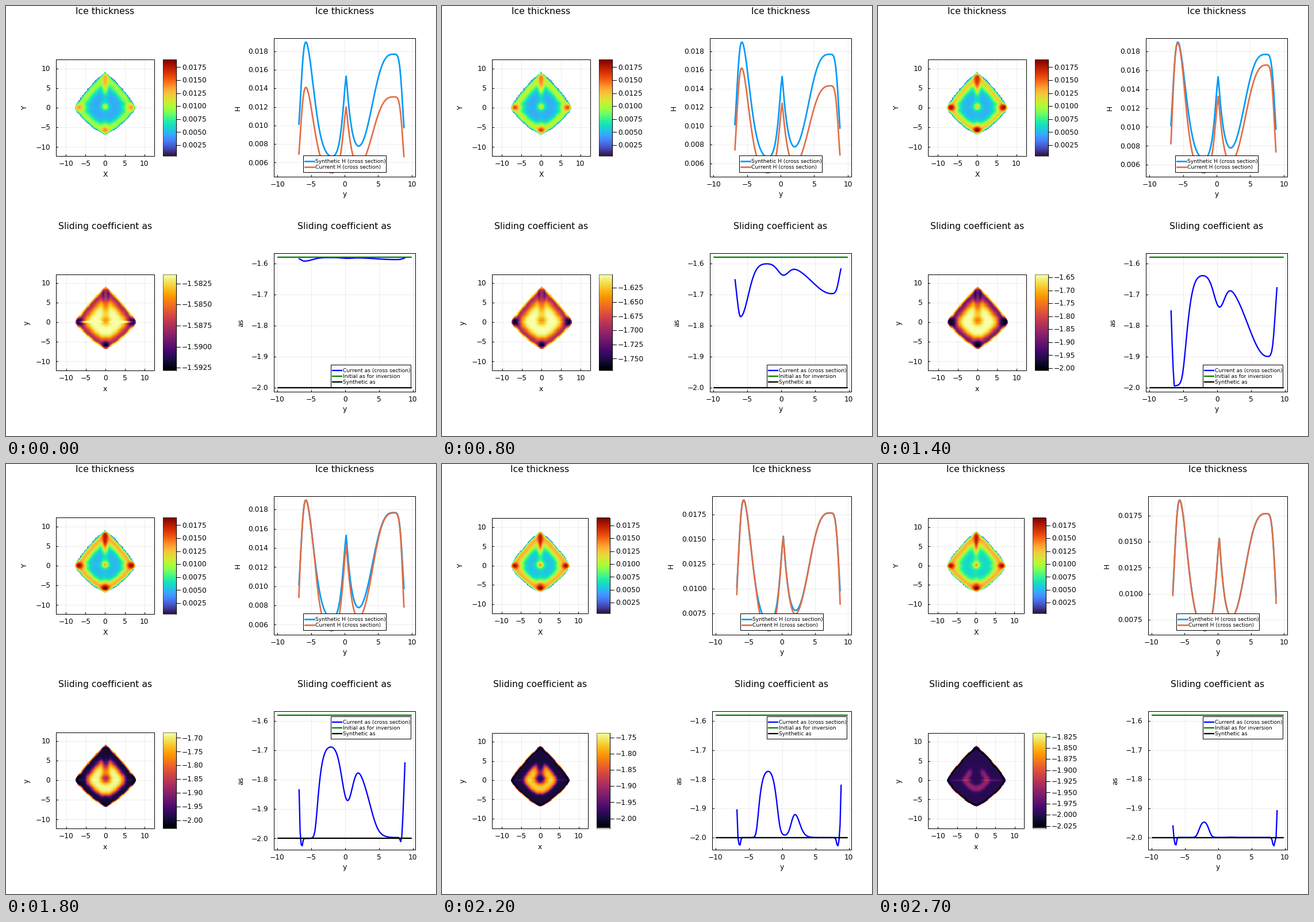
Animation of 748x748 px, one loop 2800 ms. Source, as a matplotlib script:

```python
import math

import numpy as np
import matplotlib.pyplot as plt
from matplotlib.animation import FuncAnimation
from matplotlib.patches import Rectangle

SIZE, DPI, FRAMES, STEP_MS = 748, 100, 28, 100
PX = 72 / DPI                      # points per pixel
TICK, LEGEND, TITLE = 12.3, 9.1, 15.8
BLUE, ORANGE = "#009af9", "#e26f46"
RELAYOUT, LEGEND_UP = 19, 16       # steps at which the layout / legend jump

N = 128
DX = 20 / N
GRID = -10 + DX * (np.arange(N) + 0.5)
SECTION = GRID[(GRID > -6.81) & (GRID < 8.84)]
MID = 0.234                        # the summit lies a little north of the origin
START, GOAL = -1.58, -2.0


def hill(d, wl, pl, wr=None, pr=None):
    """Bump of height 1 with its own width and power on either side."""
    wr, pr = wr or wl, pr or pl
    return np.where(d < 0, np.exp(-(np.abs(d) / wl) ** pl),
                    np.exp(-(np.abs(d) / wr) ** pr))


def ridge_height(y):
    """Synthetic thickness along x = 0, in 1e-3."""
    return (6.4 + 12.6 * hill(y + 5.74, .977, 2.5, 1.65, 1.75)
            + 8.9 * hill(y - MID, .73, 1.4, .8, 1.1)
            + 11.28 * hill(y - 7.37, 3.73, 3, 1.39, 4))


def ridge_rate(y):
    """How fast the inversion moves the coefficient along x = 0."""
    return (.011 + .092 * hill(y + 6, .75, 2, 1.6, 2) + .018 * hill(y - .3, 1.1, 2)
            + .052 * hill(y - 7.4, 4, 2, 1.25, 4))


class Ice:
    """Ice cap sampled at some points; s runs from 0 inside to 1 at the margin."""

    def __init__(self, x, y):
        self.x, self.y = x, y
        p = np.where(y > 0, 1.15, 1.28)
        b = np.where(y > 0, 8.9, 6.85)
        self.s = ((np.abs(x) / 7.75) ** p + (np.abs(y) / b) ** p) ** (1 / p)
        self.r = np.hypot(x, y - MID)
        self.outside = self.s > 1
        s = np.minimum(self.s, 1)

        slope = 6.1 + 8.9 * hill(self.r, .73, 1.4) + 7 * hill(s - .86, .21, 2, .2, 2)
        slope = slope * np.sqrt(1 - s ** 30)
        self.goal = self.spread(ridge_height, .96, slope, .9 - .15 * np.tanh(y), .8) / 1000

        slope = .011 + .018 * hill(self.r, 1.1, 2) + .049 * hill(s - .87, .22, 2, .07, 2)
        twin = hill(np.abs(x) - .65, .35, 2) * hill(y - 6.5, 1.7, 4)
        self.rate = self.spread(ridge_rate, 1, slope, .9, 1) * (1 + .3 * twin * (x != 0))

    def spread(self, ridge, side_gain, slope, axis_width, side_width):
        """Carry a ridge profile to the four arms and fill the slopes between."""
        axis = ridge(MID + np.sign(self.y - MID) * self.r)
        side = side_gain * ridge(MID - .9 * self.r)
        near_side = hill(self.y, side_width, 2)
        near_axis = hill(self.x, axis_width, 2)
        field = slope + (side - slope) * near_side
        return field + (axis - field) * near_axis

    def at(self, step):
        """Thickness and sliding coefficient at one step of the inversion."""
        span = START - GOAL
        s = np.minimum(self.s, 1)
        time = .893 * (math.exp(.135 * step) - 1) + .125
        margin = hill(1 - s, .035, 2)
        power = 8 - 6.8 * margin
        drop = self.rate * time
        drop = drop / (1 + (drop / span) ** power) ** (1 / power)
        progress = np.minimum(drop / span, 1)
        drop = drop + .03 * hill(s - .934, .025, 2) * progress ** 6

        streak = hill(self.y, .22, 2) * hill(s - .5, .35, 4) * (self.x != 0)
        least = drop[~self.outside].min()
        drop = np.maximum(drop * (1 - (.07 + .75 * math.exp(-step / 4)) * streak), least)

        ratio = .735 + .047 * hill(self.r, 1, 2) - .06 * margin
        ratio = ratio + (1 - ratio) * progress
        mask = self.outside
        return (np.ma.array(self.goal * ratio, mask=mask),
                np.ma.array(START - drop, mask=mask))


CAP = Ice(*np.meshgrid(GRID, GRID))
CUT = Ice(np.zeros_like(SECTION), SECTION)

plt.rcParams["font.family"] = "DejaVu Sans"
fig = plt.figure(figsize=(SIZE / DPI, SIZE / DPI), dpi=DPI, facecolor="white")
ax = fig.add_axes([0, 0, 1, 1])


def text(x, y, label, size=TICK, ha="center", **kw):
    """Text whose capitals are centred on y."""
    ax.text(x, y + .34 * size, label, fontsize=size * PX, ha=ha, va="baseline", **kw)


def side_label(x, y, label):
    ax.text(x, y, label, fontsize=TICK * PX, rotation=90, ha="center", va="center")


def line(xs, ys, color="black", width=1.0, **kw):
    ax.plot(xs, ys, color=color, lw=width * PX, **kw)


def number(v, digits):
    return f"{v:.{digits}f}".replace("-", "\u2212")


def multiples(step, lo, hi):
    return [k * step for k in range(math.ceil(lo / step - 1e-6),
                                    math.floor(hi / step + 1e-6) + 1)]


def nice_ticks(lo, hi):
    top = math.floor(math.log10(hi - lo))
    for base, extra in ((1, 0), (5, 0), (2.5, 1), (2, 0)):
        for power in (top, top - 1):
            ticks = multiples(base * 10.0 ** power, lo, hi)
            if 5 <= len(ticks) <= 9:
                return ticks, extra - power
    return multiples(10.0 ** top, lo, hi), -top


class Panel:
    """Boxed plot area with linear scales in stage pixels."""

    def __init__(self, box, xlim, ylim):
        self.box, self.xlim, self.ylim = box, xlim, ylim

    def px(self, v):
        l, _, r, _ = self.box
        return l + (np.asarray(v) - self.xlim[0]) / (self.xlim[1] - self.xlim[0]) * (r - l)

    def py(self, v):
        _, t, _, b = self.box
        return b - (np.asarray(v) - self.ylim[0]) / (self.ylim[1] - self.ylim[0]) * (b - t)

    def grid(self, xticks, yticks, digits):
        l, t, r, b = self.box
        for v in xticks:
            x = self.px(v)
            line([x, x], [t, b], alpha=.07, zorder=0)
            line([x, x], [b, b - 3], zorder=4)
            text(x, b + 13, number(v, 0))
        for v in yticks:
            y = self.py(v)
            line([l, r], [y, y], alpha=.07, zorder=0)
            line([l, l + 3], [y, y], zorder=4)
            text(l - 9.5, y, number(v, digits), ha="right")
        ax.add_patch(Rectangle((l, t), r - l, b - t, fill=False, lw=PX, zorder=4))

    def curve(self, xs, ys, color, width):
        line(self.px(xs), self.py(ys), color, width, zorder=3,
             solid_capstyle="round", solid_joinstyle="round")


def widen(lo, hi):
    pad = .03 * (hi - lo)
    return lo - pad, hi + pad


def heat_map(box, shift, field, clim, cmap, ticks, digits):
    l, t, r, b = box
    scale = (r - l) / 25
    half = (b - t) / 2 / scale
    panel = Panel(box, (-12.5 - shift, 12.5 - shift), (-half - shift, half - shift))
    panel.grid(range(-10, 11, 5), range(-10, 11, 5), 0)
    end = -10 + DX * field.shape[0]
    ax.imshow(field, origin="lower", cmap=cmap, vmin=clim[0], vmax=clim[1],
              extent=(panel.px(-10), panel.px(end), panel.py(-10), panel.py(end)),
              interpolation="nearest", aspect="auto", zorder=2)
    bar = r + 15
    ax.imshow(np.linspace(0, 1, 256)[:, None], origin="lower", cmap=cmap,
              extent=(bar, bar + 23, b, t), aspect="auto", zorder=2)
    ax.add_patch(Rectangle((bar, t), 23, b - t, fill=False, lw=.5 * PX, zorder=4))
    line([bar + 23] * 2, [t, b], zorder=4)
    for v in ticks:
        y = b - (v - clim[0]) / (clim[1] - clim[0]) * (b - t)
        line([bar + 23, bar + 30], [y, y], zorder=4)
        text(bar + 33, y, number(v, digits), ha="left")


def legend(x, y, w, h, first, rows, width):
    ax.add_patch(Rectangle((x, y), w, h, fc="white", ec="black", lw=PX, zorder=5))
    for i, (label, color) in enumerate(rows):
        cy = y + first + 10 * i
        line([x + 3, x + 19], [cy, cy], color, width, zorder=6)
        text(x + 21, cy, label, LEGEND, "left", zorder=6)


def draw(step):
    ax.cla()
    ax.axis("off")
    compact = step >= RELAYOUT
    h_map, a_map = CAP.at(step)
    h_now, a_now = CUT.at(step)
    h_goal = CUT.goal
    h_top = h_goal.max()

    right = 254 if compact else 258
    inset = .5 if compact else 0
    left = 470 if compact else 466
    mid_left, mid_right = (87 + right) / 2, (left + 712) / 2
    tens = range(-10, 11, 5)

    # Maps
    heat_map((87, 93 + inset, right, 261 - 2 * inset), 0, h_map, (.0004, h_top),
             "turbo", multiples(.0025, .0004, h_top), 4)
    clim = a_map.min(), a_map.max()
    heat_map((87, 467 + inset, right, 634 - inset), DX / 2, a_map[:-1, :-1], clim,
             "inferno", *nice_ticks(*clim))

    # Thickness cross section
    ylim = widen(h_now.min(), h_top)
    top = Panel((left, 56, 712, 297), widen(GRID[0], GRID[-1]), ylim)
    spacing, digits = (.0025, 4) if compact else (.002, 3)
    top.grid(tens, multiples(spacing, *ylim), digits)
    top.curve(SECTION, h_goal, BLUE, 2.7)
    top.curve(SECTION, h_now, ORANGE, 2.7)
    legend(519 if compact else 517, 260, 144, 29, 10,
           [("Synthetic H (cross section)", BLUE),
            ("Current H (cross section)", ORANGE)], 2.7)

    # Sliding cross section
    ylim = widen(min(a_now.min(), GOAL), START)
    low = Panel((left, 430, 712, 671), widen(GRID[0], GRID[-2]), ylim)
    low.grid(tens, multiples(.1, *ylim), 1)
    ends = GRID[[0, -2]]
    low.curve(SECTION, a_now, "blue", 2.3)
    low.curve(ends, [START] * 2, "green", 2.3)
    low.curve(ends, [GOAL] * 2, "black", 2.3)
    legend(565, 439 if step >= LEGEND_UP else 624, 139, 39, 9.5,
           [("Current as (cross section)", "blue"),
            ("Initial as for inversion", "green"), ("Synthetic as", "black")], 2.3)

    # Titles and axis names
    for x in (mid_left, mid_right):
        text(x, 8.3, "Ice thickness", TITLE)
        text(x, 382.3, "Sliding coefficient as", TITLE)
    for x, y, name in ((mid_left, 292.5, "X"), (mid_left, 665.7, "x"),
                       (mid_right, 327, "y"), (mid_right, 700.7, "y")):
        text(x, y, name)
    side_label(33, 177, "Y")
    side_label(36, 551, "y")
    side_label(398 if compact else 403, 177, "H")
    side_label(413 if compact else 409, 551, "as")

    ax.set_xlim(0, SIZE)
    ax.set_ylim(SIZE, 0)
    return []


anim = FuncAnimation(fig, draw, frames=FRAMES, interval=STEP_MS,
                     init_func=lambda: [], repeat=True, repeat_delay=0, blit=False)
plt.show()
```
